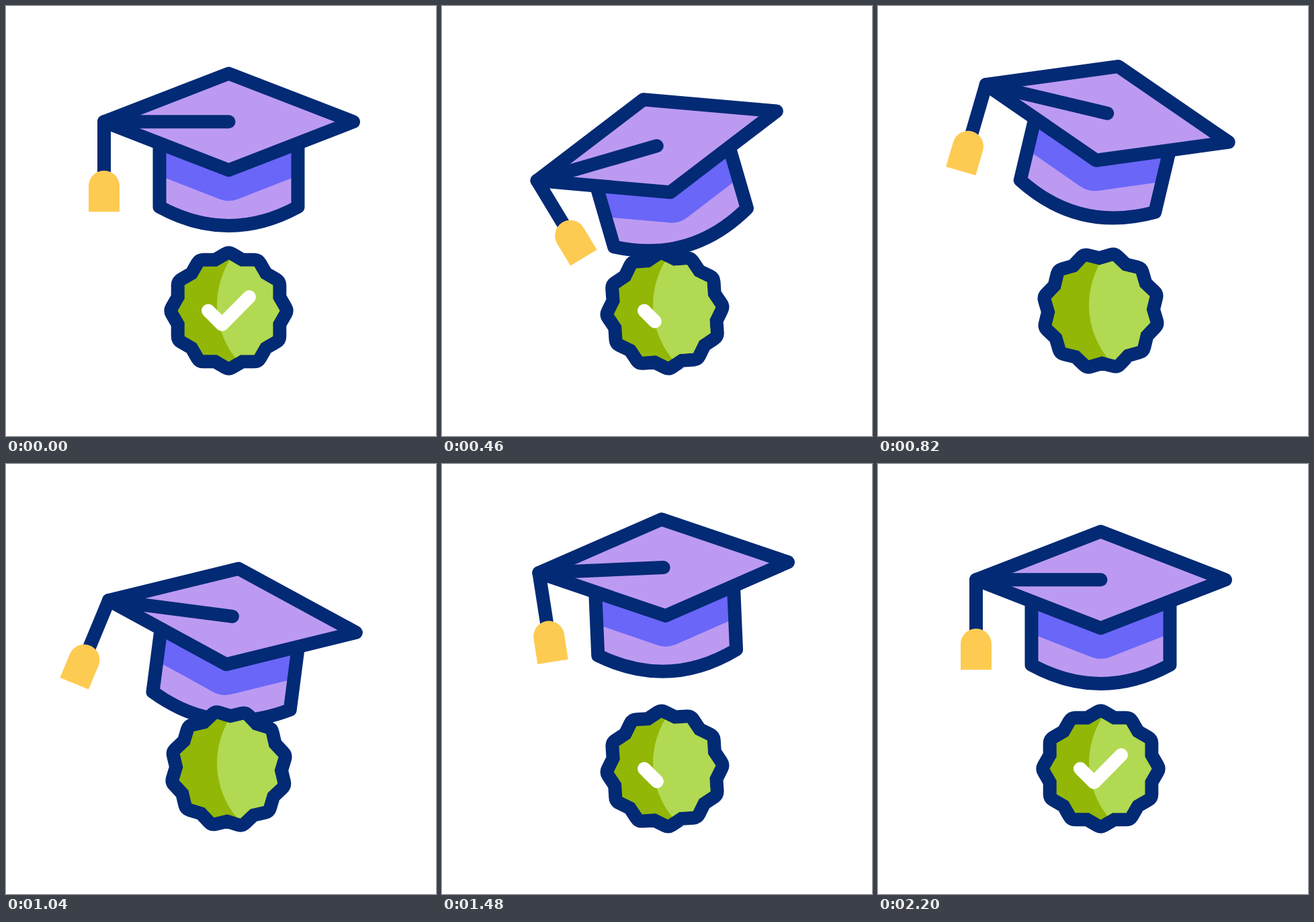
These frames come from a looping animation (640 by 640 pixels, 2400 ms). An HTML page:

```html
<!DOCTYPE html>
<html lang="en">
<head>
<meta charset="utf-8">
<title>Graduation cap and badge</title>
<style>
  html, body { margin: 0; width: 100%; height: 100%; overflow: hidden; background: #fff; }
  svg { display: block; width: 100vw; height: 100vh; }
  .line { fill: none; stroke: #032a75; stroke-width: 20; stroke-linecap: round; stroke-linejoin: round; }
</style>
</head>
<body>
<svg viewBox="0 0 640 640">
  <defs>
    <clipPath id="seal"><path id="sealClip"/></clipPath>
  </defs>

  <g id="cap">
    <path fill="#bc9af2" d="M228.5 205V299Q331.5 355 434.5 299V205Z"/>
    <path fill="#6a66f8" d="M228.5 205V252.5L318 287.5Q331.5 292.5 345 287.5L434.5 252.5V205Z"/>
    <path class="line" d="M228.5 208V299Q331.5 355 434.5 299V208"/>
    <path class="line" style="fill:#bc9af2" d="M331.5 100.5L517 172.3L331.5 244.2L146 172.3Z"/>
    <path class="line" d="M146 172.3H331.5"/>
    <g id="tassel">
      <path class="line" d="M146 172.3V252"/>
      <path fill="#fdcb52" d="M123 306.3V268a23 23 0 0 1 46 0V306.3Z"/>
    </g>
  </g>

  <path id="rim" fill="#032a75" stroke="#032a75" stroke-width="40" stroke-linejoin="round"/>
  <g clip-path="url(#seal)">
    <rect x="240" y="360" width="190" height="190" fill="#92b706"/>
    <circle cx="441" cy="445" r="127" fill="#b1d952"/>
  </g>
  <path id="tick" class="line" style="stroke:#fff" pathLength="1" d="M301 453.5L321.5 474L362 433"/>
</svg>
<script>
  const LOOP = 2400, STEP = 20, END = 2200;
  const get = id => document.getElementById(id);
  const cap = get('cap'), tassel = get('tassel'), tick = get('tick');
  const rim = get('rim'), sealClip = get('sealClip');

  function ease(x) {
    const s = Math.min(1, Math.max(0, x));
    return s * s * (3 - 2 * s);
  }

  // Evenly timed beats from rest: eased at turning points, flowing through the others.
  function beats(delay, gap, ...peaks) {
    const v = [0, ...peaks], last = v.length - 1;
    const slope = i => {
      const a = v[i] - v[i - 1], b = v[i + 1] - v[i];
      return a * b > 0 ? 2 * a * b / (a + b) : 0;
    };
    return t => {
      const x = Math.min(last, Math.max(0, (t - delay) / gap));
      const i = Math.min(last - 1, Math.floor(x)), s = x - i;
      return v[i] + (v[i + 1] - v[i]) * ease(s)
        + s * (1 - s) * (slope(i) * (1 - s) - slope(i + 1) * s);
    };
  }

  const lift = beats(0, 353, 54, -36, 55, -22, 16.3, 0);
  const tilt = beats(0, 434, -16.5, 14.4, -5.8, 3.3, 0);
  const swing = beats(180, 404, -19.3, 16.2, -7.8, 3.6, 0);
  const spin = beats(0, 440, 25, 45, 49.5, 74, 90);
  const drawn = t => Math.max(1 - ease(t / 690), ease((t - 1281) / 538));

  // Twelve-pointed outline of two crossed hexagons.
  function star(turn) {
    const pts = [];
    for (let i = 0; i < 24; i++) {
      const a = (i * 15 + turn) * Math.PI / 180, r = i % 2 ? 68.1 : 76;
      pts.push((331.5 + r * Math.sin(a)).toFixed(2) + ' ' + (453.5 - r * Math.cos(a)).toFixed(2));
    }
    return 'M' + pts.join('L') + 'Z';
  }

  function render(t) {
    cap.setAttribute('transform', `translate(0 ${lift(t)}) rotate(${tilt(t)} 331.5 214.5)`);
    tassel.setAttribute('transform', `rotate(${swing(t)} 146 172.3)`);
    const d = star(spin(t));
    rim.setAttribute('d', d);
    sealClip.setAttribute('d', d);
    const k = drawn(t);
    tick.style.display = k > 0.001 ? '' : 'none';
    tick.setAttribute('stroke-dasharray', k > 0.999 ? 'none' : `${k} 2`);
  }

  const start = performance.now();
  function frame() {
    const t = (performance.now() - start) % LOOP;
    render(Math.min(END, Math.floor(t / STEP) * STEP));
    requestAnimationFrame(frame);
  }
  frame();
</script>
</body>
</html>
```
